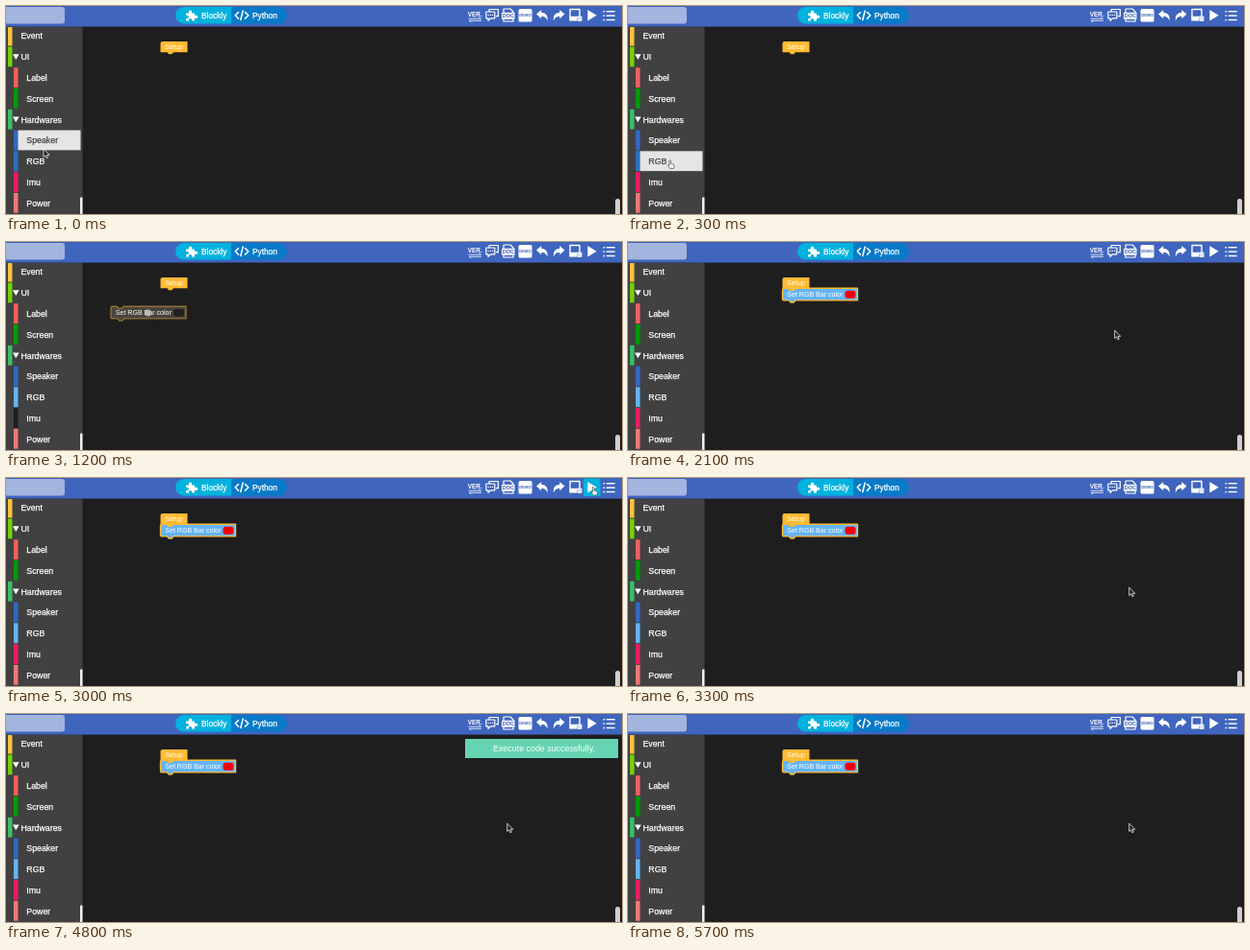
Animation of 640 by 217 pixels, one loop 6 s. Source, as an HTML page with a canvas:

```html
<!DOCTYPE html>
<html lang="en">
<head>
<meta charset="utf-8">
<title>Block editor</title>
<style>
html, body { margin: 0; width: 100%; height: 100%; overflow: hidden; background: #1e1e1e; }
canvas { display: block; width: 640px; height: 217px; }
</style>
</head>
<body>
<canvas id="stage"></canvas>
<script>
const W = 640, H = 217, LOOP = 6000, STEP = 300;
const FONT = '"Liberation Sans", Arial, sans-serif';
const BLUE = '#64b5f6', AMBER = '#ffbb33', BAR = '#3f65be', CYAN = '#00b2de', RED = '#f40009';
const canvas = document.getElementById('stage');
const ctx = canvas.getContext('2d');
const dpr = window.devicePixelRatio || 1;
canvas.width = W * dpr;
canvas.height = H * dpr;

function rect(x, y, w, h, color) {
  ctx.fillStyle = color;
  ctx.fillRect(x, y, w, h);
}

function round(x, y, w, h, r, color) {
  ctx.beginPath();
  ctx.roundRect(x, y, w, h, r);
  ctx.fillStyle = color;
  ctx.fill();
}

function text(str, x, y, size, color = '#fff', weight = 'normal', align = 'left') {
  ctx.font = `${weight} ${size}px ${FONT}`;
  ctx.textAlign = align;
  ctx.textBaseline = 'alphabetic';
  ctx.fillStyle = color;
  ctx.fillText(str, x, y);
}

// Heavier than regular, lighter than bold
function mediumText(str, x, y, size, color = '#fff') {
  text(str, x, y, size, color);
  ctx.strokeStyle = color;
  ctx.lineWidth = 0.25;
  ctx.strokeText(str, x, y);
}

function draw(d, { fill, stroke, width = 1 }) {
  const path = new Path2D(d);
  if (fill) {
    ctx.fillStyle = fill;
    ctx.fill(path);
  }
  if (stroke) {
    ctx.strokeStyle = stroke;
    ctx.lineWidth = width;
    ctx.lineJoin = ctx.lineCap = 'round';
    ctx.stroke(path);
  }
}

function at(x, y, paint) {
  ctx.save();
  ctx.translate(x, y);
  paint();
  ctx.restore();
}

// ---- Top bar ----

function drawTabs() {
  round(-4, 1, 65, 17.5, 3, '#a3b4de');
  round(176, 1, 58, 17.5, [9, 0, 0, 9], CYAN);
  round(234, 1, 58, 17.5, [0, 9, 9, 0], '#087ac8');
  at(187, 4, () => {
    rect(0, 3.5, 9, 8, '#fff');
    for (const [x, y, color] of [[4.5, 2.4, '#fff'], [10.4, 7.2, '#fff'], [1, 7.5, CYAN], [4.5, 10.8, CYAN]]) {
      ctx.beginPath();
      ctx.arc(x, y, 1.8, 0, 7);
      ctx.fillStyle = color;
      ctx.fill();
    }
  });
  mediumText('Blockly', 203, 12.7, 8.3);
  draw('M241.5 6.5l-3.3 3.3 3.3 3.3M248.5 6.5l3.3 3.3-3.3 3.3M246.2 5l-2.4 9.5', { stroke: '#fff', width: 1.5 });
  mediumText('Python', 256, 12.7, 8.3);
}

function drawIcons(playHot) {
  const white = { stroke: '#fff', width: 1.2 };
  text('VER.', 487.3, 10.7, 6.4, '#fff', 'bold', 'center');
  draw('M481 13.2h12.5l-2-1.4M493.5 15.3h-12.5l2 1.2', { stroke: '#fff', width: 0.8 });

  draw('M502 6V3.5h9.3v7.2h-2', white);
  draw('M498.8 6h9v6.8h-4.5l-2.3 2.6v-2.6h-2.2z', white);
  draw('M501 9.4h.2M503.2 9.4h.2M505.4 9.4h.2', white);

  draw('M517 6.5V3h7l3 3v.7M517 14v2h10v-2', white);
  round(515, 6.7, 13.5, 7, 0.5, '#fff');
  text('DOC', 521.8, 12.3, 5.5, BAR, 'bold', 'center');

  round(532.5, 3, 14, 13.5, 1.5, '#fff');
  text('DEMO', 539.5, 11.3, 4.2, BAR, 'bold', 'center');

  const arrow = 'M0 4.6L5.2 0v2.7C10 2.9 12.2 6 11.5 11.3 10.2 8 8.4 6.8 5.2 6.8v2.5z';
  at(551, 4, () => draw(arrow, { fill: '#fff' }));
  at(580.5, 4, () => {
    ctx.scale(-1, 1);
    draw(arrow, { fill: '#fff' });
  });

  draw('M586 3.5h10v8h-10z', { stroke: '#fff', width: 1.4 });
  rect(585.3, 11, 8, 4.5, '#fff');
  round(593.5, 10.5, 5, 5.5, 1, '#dfe6f6');

  if (playHot) rect(600, 0.5, 17.5, 18.5, CYAN);
  draw('M604.3 4l9.4 5.8-9.4 5.8z', { fill: '#fff' });

  for (let y = 5; y < 15; y += 4.4) {
    rect(620.5, y, 1.6, 1.5, '#fff');
    rect(623.7, y, 9, 1.4, '#fff');
  }
}

// ---- Category list ----

const categories = [
  ['Event', '#fdc13c', 0], ['UI', '#72d10c', 0, true], ['Label', '#f0625d', 1],
  ['Screen', '#009a0c', 1], ['Hardwares', '#3cbe68', 0, true], ['Speaker', '#3268c4', 1],
  ['RGB', BLUE, 1], ['Imu', '#e91e63', 1], ['Power', '#f07878', 1]
];

function drawCategories({ hover, open, dim, early }) {
  rect(0, 21.5, 79.5, H, '#414141');
  categories.forEach(([name, base, level, group], i) => {
    const y = 20.7 + i * 21.78;
    const left = level ? 8 : 2;
    let color = base;
    if (name === 'RGB' && early) color = '#2e6fc0';
    if (name === 'Imu' && dim) color = '#201d20';
    const top = Math.max(y, 22);
    rect(left, top, 4.5, y + 20.8 - top, color);
    if (name === open) rect(left, y, 69.5, 20.8, BLUE);
    if (name === hover) rect(12.5, y, 65, 20.8, '#e6e5e6');
    if (group) draw(`M7 ${y + 7.8}h6.6l-3.3 5.6z`, { fill: '#fff' });
    mediumText(name, level ? 21.3 : 15.4, y + 13.7, 8.8, name === hover ? '#444' : '#fff');
  });
  round(77, 199.5, 2.5, 20, 1, '#f0f0f0');
}

// ---- Blocks ----

function blockShape(x, y, w, h, fill, stroke) {
  const d = `M${x} ${y + 2}q0-2 2-2h4.5l1.5 2h3.5l1.5-2H${x + w}v${h}H${x + 13.5}` +
    `l-1.8 2.2h-3l-1.8-2.2H${x + 2}q-2 0-2-2z`;
  draw(d, { fill, stroke, width: 1.4 });
}

const label = (str, x, mid, color) => text(str, x, mid + 2.4, 7.05, color);

function swatch(x, mid, color = RED) {
  round(x, mid - 4, 11, 8, 2.5, color);
}

function numberField(str, x, mid, w = 12) {
  round(x - 2, mid - 7, w + 4, 14, 1, '#8ecaf9');
  round(x - 4, mid - 3, 4, 5, 1.5, '#8ecaf9');
  round(x, mid - 4.7, w, 9.4, 2, '#dff0fd');
  text(str, x + w / 2, mid + 2.6, 7.05, '#333', 'normal', 'center');
}

function sideField(mid) {
  round(106, mid - 4.5, 20.5, 9, 2, '#c3e2fc');
  label('left', 108, mid, '#333');
  draw(`M121 ${mid - 0.7}h3l-1.5 2z`, { fill: '#5b8db8' });
}

function setupBlock() {
  draw('M160.5 39q0-2 2-2H188.5V48.3H174l-1.8 2h-3l-1.8-2H160.5z', { fill: AMBER });
  text('Setup', 165, 45.2, 7.2);
}

function barBlock(x, y, dim) {
  blockShape(x, y, 78, 12.6, dim ? '#48453c' : BLUE, dim ? '#8f7138' : AMBER);
  label('Set RGB Bar color', x + 4.8, y + 6.3);
  swatch(x + 65, y + 6.5, dim ? '#211f20' : RED);
}

function rgbFields(mid, r, g, b) {
  numberField('0', r, mid);
  label('G', g - 14, mid);
  numberField('0', g, mid);
  label('B', b - 13.5, mid);
  numberField('0', b, mid);
}

function drawFlyout(selected) {
  rect(79.5, 21.5, 225.5, H, 'rgba(70,70,70,.84)');
  const row = (mid, w, h, ...words) => {
    blockShape(87.5, mid - h / 2, w, h, BLUE);
    for (const [str, x] of words) label(str, x, mid);
  };

  row(32.4, 78, 12.6, ['Set RGB Bar color', 92.3]);
  if (selected) barBlock(87.5, 26, false);
  swatch(152.5, 32.5);

  row(61, 161, 17, ['Set RGB Bar color R', 92.3]);
  rgbFields(61, 166, 198, 230);

  row(90, 116.5, 13.5, ['Set', 92.3], ['side RGB Bar color', 128.7]);
  sideField(90);
  swatch(190, 90);

  row(118.4, 208.5, 17, ['Set', 92.3], ['side RGB Bar color by R', 128.7]);
  sideField(118.4);
  rgbFields(118.4, 213, 245.5, 277.5);

  row(150, 102.5, 17, ['Set the', 92.3], ['RGB color', 141]);
  numberField('1', 123, 150, 13);
  swatch(176, 150);

  row(181.8, 194, 17, ['Set the', 92.3], ['RGB color by R', 141]);
  numberField('1', 123, 181.8, 13);
  rgbFields(181.8, 199, 231.5, 263.5);

  row(212.4, 97, 17, ['Set RGB brightness', 92.3]);
  numberField('10', 163, 212.4, 16);
}

function drawGrid() {
  ctx.fillStyle = '#2b2b2b';
  for (let y = 32; y < H; y += 10) {
    for (let x = 90; x < 632; x += 10) ctx.fillRect(x, y, 1, 1);
  }
}

// ---- Overlay ----

function drawToast(x) {
  rect(x, 26, 159, 20, '#66d4b2');
  text('Execute code successfully.', x + 29, 39, 8.9, '#f5fffc');
}

function drawCursor([x, y, kind]) {
  at(x, y, () => {
    if (kind === 'hand') {
      draw('M1 0q1-.8 1.6.5V3.4l2.8.9q1 .5.7 1.6L5.5 8.5H1.7L-.6 5.4q0-1 1.4-.5z',
        { fill: '#f2f2f2', stroke: '#333', width: 0.6 });
    } else if (kind === 'grab') {
      round(-2.5, -2.5, 6, 7, 2, 'rgba(200,200,200,.75)');
    } else {
      draw('M0 0v8l1.8-1.6 1.4 2.9 1.4-.7-1.3-2.7h2.4z', { fill: '#222', stroke: '#eee', width: 0.8 });
    }
  });
}

// Time from which the pointer rests at each place
const pointer = [
  [0, 39, 149.5], [300, 42, 161, 'hand'], [900, 123, 29, 'hand'], [1200, 147, 73, 'grab'],
  [1500, 198, 54, 'hand'], [1800, 330, 78], [2100, 505.7, 92.5], [2400, 607, 70.5],
  [2700, 608.5, 9.5, 'hand'], [3300, 520.7, 114.5]
];

function render(ms) {
  const t = Math.floor((ms % LOOP) / STEP) * STEP;
  const between = (a, b) => t >= a && t < b;
  const dim = between(1200, 1500);
  const flyout = between(600, 1200);

  ctx.setTransform(dpr, 0, 0, dpr, 0, 0);
  rect(0, 0, W, H, '#1e1e1e');
  drawGrid();
  setupBlock();
  if (dim) barBlock(109, 67.3, true);
  if (t >= 1500) barBlock(160.5, 48.3, false);
  if (flyout) drawFlyout(t >= 900);
  round(633, 201, 5, 20, 2.5, '#cfcfcf');

  drawCategories({
    hover: t < 300 ? 'Speaker' : t < 600 ? 'RGB' : '',
    open: flyout ? 'RGB' : '',
    dim,
    early: t < 600
  });
  rect(0, 0, W, 21.5, BAR);
  drawTabs();
  drawIcons(between(2700, 3300));
  if (between(3900, 5700)) drawToast(t < 4200 ? 481 : 477);
  drawCursor(pointer.findLast(p => p[0] <= t).slice(1));
}

const start = performance.now();
function tick() {
  render(performance.now() - start);
  requestAnimationFrame(tick);
}
tick();
</script>
</body>
</html>
```
